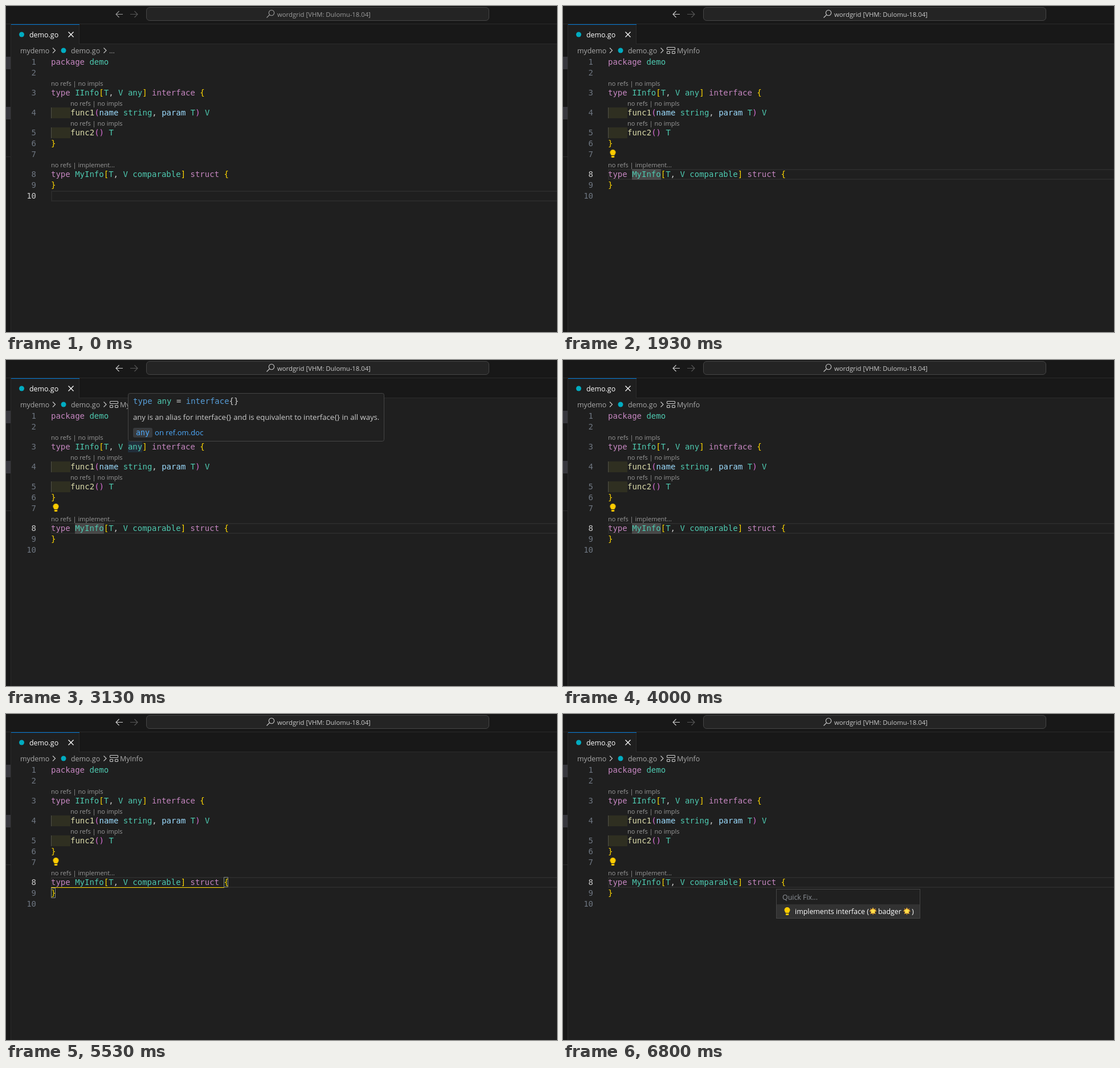
Recreate the animation shown at these times as an HTML page. Size 967 px wide and 572 px high, loop 8000 ms.

```html
<!DOCTYPE html>
<html lang="en">
<head>
<meta charset="utf-8">
<title>Editor</title>
<style>
  html, body { margin: 0; width: 100%; height: 100%; overflow: hidden; background: #1f1f1f; }
  svg { display: block; width: 967px; height: 572px; }
  text { white-space: pre; font: 12.4px "Open Sans", "Noto Sans", sans-serif; fill: #ccc; }
  .mono { font: 14px "DejaVu Sans Mono", monospace; }
  .num { fill: #6e7681; text-anchor: end; }
  .lens { font-size: 11px; fill: #999; }
  .crumb { fill: #a9a9a9; }
  .doc { font-size: 13.1px; }
  .line { fill: none; stroke: #ccc; stroke-width: 1.1; }
  .rule { fill: #2b2b2b; }
  .k { fill: #c586c0; } .t { fill: #4ec9b0; } .f { fill: #dcdcaa; } .v { fill: #9cdcfe; }
  .y { fill: #ffd700; } .p { fill: #da70d6; } .b { fill: #569cd6; } .w { fill: #ccc; }
</style>
</head>
<body>
<svg viewBox="0 0 967 572">
  <defs>
    <g id="bulb">
      <path d="M-5 -2a5 5 0 1 1 10 0c0 2-1.6 3-2.2 5h-5.6c-.6-2-2.2-3-2.2-5z" fill="#fc0"/>
      <path d="M-2.6 4h5.2v2q0 1-1 1h-3.2q-1 0-1-1z" fill="#fc0"/>
    </g>
    <g id="crumbIcon" class="line">
      <rect x="182.5" y="72.5" width="14" height="4" rx="1"/>
      <rect x="182.5" y="79.5" width="5" height="4" rx="1"/>
      <rect x="191.5" y="79.5" width="5" height="4" rx="1"/>
    </g>
  </defs>

  <rect width="967" height="572" fill="#1f1f1f"/>
  <rect width="967" height="67" fill="#181818"/>
  <rect y="32" width="8" height="540" fill="#181818"/>
  <path class="rule" d="M0 31h967v1H0zM8 32h1v540h-1zM0 264h8v1H0zM129 66h838v1H129z"/>
  <path fill="#37373d" d="M0 89h8v22H0zM0 177h8v22H0z"/>

  <rect x="246.5" y="2.5" width="601" height="23" rx="5.5" fill="#242424" stroke="#454545"/>
  <path class="line" opacity=".35" d="M218 14.5h13M225.500 9l5.500 5.500-5.500 5.500"/>
  <g id="title">
    <path class="line" d="M205 14.500h-12M198.500 9l-5.500 5.500 5.500 5.500"/>
    <circle class="line" cx="466" cy="12" r="4.7"/>
    <path class="line" d="M462.500 15.500L457.500 20.500"/>
    <text x="476" y="19" style="font-size:11.3px">wordgrid [VHM: Dulomu-18.04]</text>
  </g>

  <rect x="9" y="32" width="120" height="35" fill="#1f1f1f"/>
  <rect x="128" y="32" width="1" height="35" class="rule"/>
  <rect x="9" y="32" width="120" height="1" fill="#0078d4"/>
  <circle cx="27.500" cy="50" r="4.500" fill="#00acc1"/>
  <text x="41" y="55" style="fill:#fff">demo.go</text>
  <path class="line" d="M109.500 45.500l9 9M118.500 45.500l-9 9" style="stroke:#fff;stroke-width:1.3"/>

  <text class="crumb" x="25" y="83">mydemo</text>
  <circle cx="101" cy="78" r="4.500" fill="#00acc1"/>
  <text class="crumb" x="114" y="83">demo.go</text>
  <path class="line" d="M82 73.500l4.500 4.500-4.500 4.500M171.500 73.500l4.500 4.500-4.500 4.500"/>
  <text id="dots" class="crumb" x="181" y="83">...</text>
  <g id="symbol">
    <use href="#crumbIcon"/>
    <text class="crumb" x="200" y="83">MyInfo</text>
  </g>

  <path fill="#2f2f21" d="M79 178h34v19H79zM79 213h34v19H79z"/>
  <path fill="#505046" d="M79 178h1v19h-1zM79 213h1v19h-1z"/>
  <rect id="row" x="80" y="287" width="900" height="17" fill="none" stroke="#2a2a2a" stroke-width="2"/>
  <rect id="word" x="121" y="286" width="51" height="19" fill="#575757" opacity="0"/>
  <rect id="hot" x="214" y="143" width="25" height="19" fill="#264f78" opacity="0"/>
  <g id="pair" opacity="0">
    <path fill="#ffd700" d="M79 304h304v1H79z"/>
    <path fill="#1c261c" stroke="#888" d="M382.500 286.500h7v17h-7zM79.500 305.500h7v17h-7z"/>
  </g>
  <g id="code"></g>
  <use id="hint" href="#bulb" x="87.500" y="259"/>
  <rect id="caret" x="0" y="286" width="2" height="19" fill="#aeafad"/>

  <g id="tip" opacity="0">
    <rect x="214.500" y="58.500" width="449" height="84" rx="3" fill="#202020" stroke="#454545"/>
    <text class="mono" x="223" y="77"><tspan class="b">type </tspan><tspan class="t">any</tspan> = <tspan class="b">interface</tspan>{}</text>
    <text class="doc" x="223" y="105">any is an alias for interface{} and is equivalent to interface{} in all ways.</text>
    <rect x="223" y="119" width="34" height="17" rx="3" fill="#383a3d"/>
    <text class="mono" x="228" y="132" style="font-size:13.3px;fill:#4daafc">any</text>
    <text class="doc" x="261" y="132" style="fill:#4daafc">on ref.om.doc</text>
  </g>

  <g id="menu" opacity="0">
    <rect x="374.500" y="307.500" width="252" height="51" fill="#202020" stroke="#454545"/>
    <rect x="375" y="334" width="251" height="24" fill="#323232"/>
    <text x="385" y="326" style="fill:#8b9096;font-weight:500">Quick Fix...</text>
    <use href="#bulb" x="393.500" y="346"/>
    <g id="label" style="--ink:#fff">
      <text x="407" y="351" style="fill:#fff">implements interface (</text>
      <text x="553" y="351" style="fill:#fff">badger</text>
      <text x="612" y="351" style="fill:#fff">)</text>
    </g>
  </g>
</svg>
<script>
const LOOP = 8000;
const $ = id => document.getElementById(id);
const esc = s => s.replace(/</g, "&lt;");

// Tokens are "class:text" joined by "~".
const tokens = src => src.split("~").map(tok =>
  `<tspan class="${tok[0]}">${esc(tok.slice(2))}</tspan>`).join("");

// Each row: vertical centre, tokens, indent.
const rows = [
  [98, "k:package ~t:demo"],
  [117],
  [152, "k:type ~t:IInfo~y:[~t:T~w:, ~t:V any~y:]~k: interface ~y:{"],
  [187, "f:func1~p:(~v:name ~t:string~w:, ~v:param ~t:T~p:)~t: V", 34],
  [222, "f:func2~p:()~t: T", 34],
  [241, "y:}"],
  [260],
  [295, "k:type ~t:MyInfo~y:[~t:T~w:, ~t:V comparable~y:]~k: struct ~y:{"],
  [314, "y:}"],
  [333]
];
// Each lens: centre, x, second link.
const lenses = [[136, 79, "no impls"], [171, 113, "no impls"], [206, 113, "no impls"], [279, 79, "implement..."]];

$("code").innerHTML = rows.map(([y, src, indent = 0], i) =>
  `<text id="n${i + 1}" class="mono num" x="53" y="${y + 5}">${i + 1}</text>` +
  (src ? `<text class="mono" x="${79 + indent}" y="${y + 5}">${tokens(src)}</text>` : "")).join("") +
  lenses.map(([y, x, link], i) =>
    `<text class="lens" x="${x}" y="${y + 4}">no refs | <tspan id="lens${i}">${link}</tspan></text>`).join("");

// Glowing star: orange rays behind a yellow five-pointed star.
const star = (n, outer, inner) => Array.from({ length: n * 2 }, (_, i) => {
  const a = Math.PI * (i / n - 0.5), r = i % 2 ? inner : outer;
  return `${(r * Math.cos(a)).toFixed(2)},${(r * Math.sin(a)).toFixed(2)}`;
}).join(" ");
for (const x of [544, 603.5]) {
  $("label").insertAdjacentHTML("beforeend", `<g transform="translate(${x} 346)">
    <polygon points="${star(8, 7, 3.5)}" fill="#f09a2a"/>
    <polygon points="${star(5, 6, 2.8)}" fill="#ffe04a"/></g>`);
}

// Holds each value until the next listed time.
function track(id, prop, steps) {
  const keys = steps.map(([t, v]) => ({ offset: t / LOOP, [prop]: v, easing: "step-end" }));
  keys.push({ offset: 1, [prop]: steps[steps.length - 1][1] });
  $(id).animate(keys, { duration: LOOP, iterations: Infinity });
}
const toggle = (id, first, ...times) =>
  track(id, "opacity", [[0, first], ...times.map((t, i) => [t, i % 2 ? first : 1 - first])]);
const at = x => `translateX(${x}px)`;

track("title", "opacity", [[0, 0.72], [1470, 1]]);
track("n8", "fill", [[0, "#6e7681"], [1470, "#cccccc"]]);
track("n10", "fill", [[0, "#cccccc"], [1470, "#6e7681"]]);
track("row", "transform", [[0, "translateY(38px)"], [1470, "translateY(0px)"]]);
toggle("dots", 1, 1600);
toggle("symbol", 0, 1600);
toggle("hint", 0, 1730);
track("word", "opacity", [[0, 0], [1730, 0.72], [5070, 0]]);
track("hot", "opacity", [[0, 0], [3000, 0.3], [3270, 0]]);
track("tip", "opacity", [[0, 0], [3000, 0.16], [3070, 0.7], [3130, 1], [3270, 0]]);
track("lens0", "fill", [[0, "#999999"], [3600, "#4daafc"], [3730, "#999999"]]);
toggle("pair", 0, 5130, 5730);
toggle("menu", 0, 6800);
track("caret", "transform", [[0, at(162)], [5070, at(390)], [5670, at(373)]]);
toggle("caret", 0, 1470, 1930, 2470, 3000, 3470, 4000, 4470, 4930, 5070, 5530, 5670, 6200, 6670, 6800);
</script>
</body>
</html>
```
